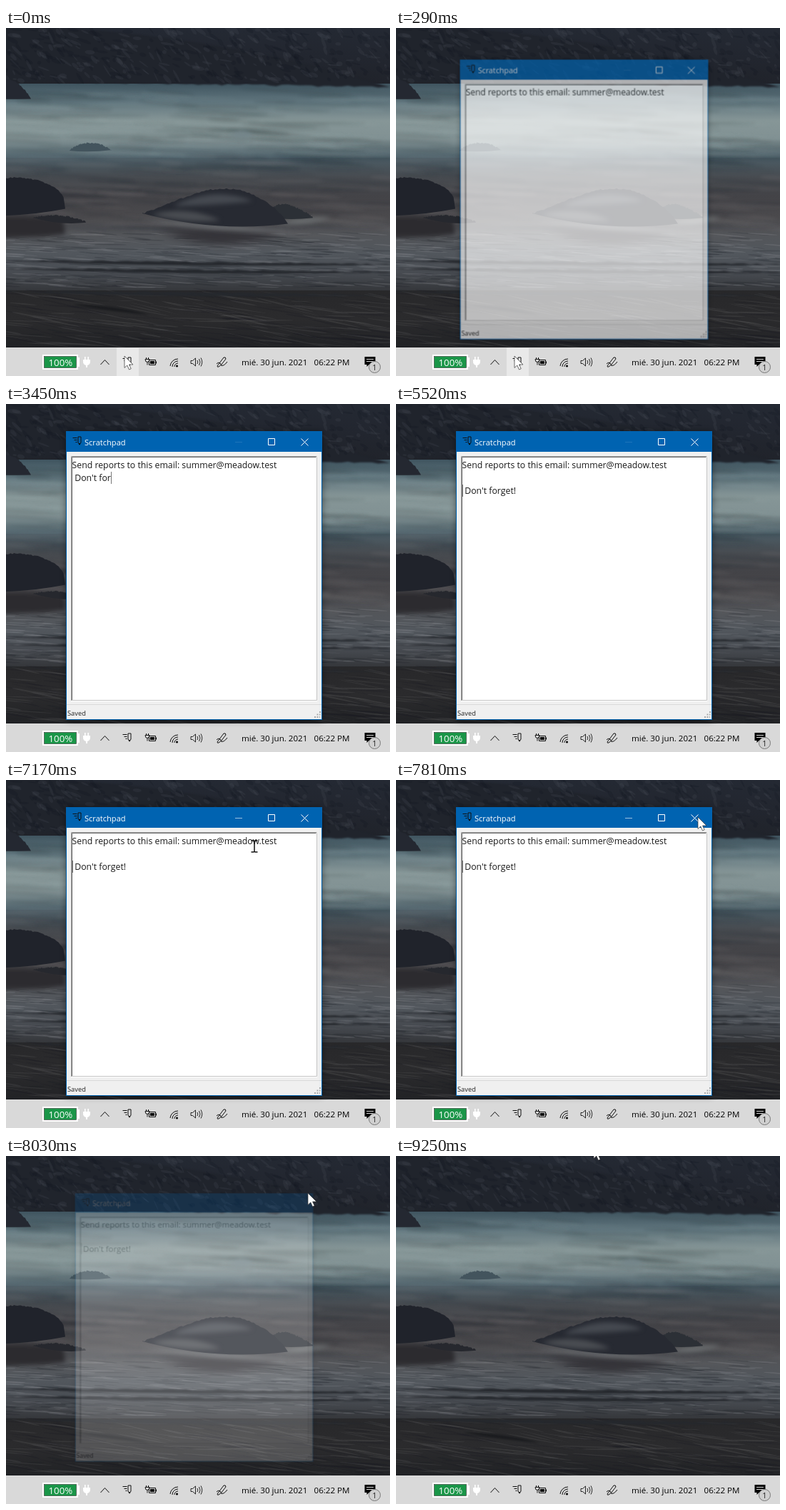
An HTML page with a canvas for the animation above (9.87 s loop, 538 by 488 pixels).

```html
<!DOCTYPE html>
<html lang="es">
<head>
<meta charset="utf-8">
<title>Scratchpad</title>
<style>
  html, body { margin: 0; width: 538px; height: 488px; overflow: hidden; background: #22262e; }
  canvas, svg { position: absolute; left: 0; top: 0; }
  text { font-family: "Open Sans", "Noto Sans", sans-serif; white-space: pre; }
  .pad text { font-size: 12.3px; fill: #1a1a1a; }
  .line { fill: none; stroke: #111; }
  #win { transform-origin: 263.5px 240.5px; filter: drop-shadow(0 1px 4px #0007); animation: win 9870ms linear infinite; }
  #hot { animation: hot 9870ms linear infinite; }
  #buttons { animation: buttons 9870ms step-end infinite; }
  #min { animation: min 9870ms step-end infinite; }
  @keyframes win {
    0%, 1.62% { opacity: 0; transform: scale(.9); animation-timing-function: ease-out; }
    4.25%, 79.94% { opacity: 1; transform: none; }
    80.65% { opacity: .6; transform: scale(.983); }
    81.76%, 100% { opacity: 0; transform: scale(.9); }
  }
  @keyframes hot {
    0%, 8.4% { opacity: 1; }
    11.35% { opacity: .45; }
    14.7%, 100% { opacity: 0; }
  }
  @keyframes buttons { 0% { opacity: 1; } 79.94%, 100% { opacity: 0; } }
  @keyframes min { 0% { opacity: .12; } 71.2%, 100% { opacity: .6; } }
</style>
</head>
<body>
<canvas id="sea" width="538" height="488"></canvas>
<svg width="538" height="488" viewBox="0 0 538 488">
  <defs>
    <g id="pen">
      <path class="line" d="M0 2h6M2 5h4M4 8h2M7.5 .5h4v8l-2 3l-2-3z"/>
      <path d="M8.500 9.500h2l-1 3z"/>
    </g>
  </defs>

  <g id="bar">
    <rect y="448" width="538" height="40" fill="#d9d9d9"/>
    <rect id="hot" x="155" y="449" width="31" height="39" fill="#e9e9e9"/>
    <path fill="#fff" d="M51 458h50v4h2v13h-2v4h-50z"/>
    <rect x="53.5" y="460.5" width="45" height="16" fill="#1a9648" stroke="#333" stroke-width=".6"/>
    <text x="59.5" y="473.5" font-size="13.3" fill="#fff">100%</text>
    <path fill="#fff" d="M110 461h1.600v4h2.800v-4h1.600v4h2v3q0 4-4 5v3h-2v-3q-4-1-4-5v-3h2z"/>
    <path class="line" d="M132.500 472l6-6.500l6 6.500"/>
    <use href="#pen" x="163.500" y="461.500"/>
    <g transform="translate(195 462)">
      <path class="line" d="M5.500 3.500h9v7h-9zM15.500 5.500v3"/>
      <path d="M7 5h6v4h-6z"/>
      <path class="line" d="M1.500 0v2M4.500 0v2M0 2.500h6q0 4-3 4t-3-4M3 6.500v4"/>
    </g>
    <g transform="translate(241 475)">
      <path class="line" d="M-11-1a11 11 0 0 1 11-10M-8 0a8 8 0 0 1 8-8M-5 0a5 5 0 0 1 5-5"/>
      <circle cx="-1.500" cy="-1" r="1.500"/>
    </g>
    <path class="line" stroke-width=".9" d="M259 466.500h2.500l4-3.500v11l-4-3.500h-2.500zM268 466q1.500 2.500 0 5M270.500 464q3 4.500 0 9M273 462.500q3.500 6 0 12"/>
    <path class="line" d="M295 471q2-3 5-1t-2 5q-2 1-2-1l9-12q3-1 3 2l-7 9q4 2 9-5"/>
    <g font-size="11.6" font-weight="500" fill="#000">
      <text x="330" y="473">mié. 30 jun. 2021</text>
      <text x="431.500" y="473">06:22 PM</text>
    </g>
    <path d="M502.500 461h15v11h-9l-3 3v-3h-3z"/>
    <path stroke="#ddd" d="M505 464.500h10M505 467.500h10"/>
    <circle cx="516.500" cy="475.500" r="8" fill="#d0d0d0" stroke="#777"/>
    <text x="516.500" y="479.500" font-size="11" text-anchor="middle" fill="#222">1</text>
  </g>

  <g id="win">
    <rect x="84" y="38" width="359" height="405" fill="#0063b1"/>
    <rect x="85" y="67" width="357" height="375" fill="#f0f0f0"/>
    <use href="#pen" x="93.500" y="45.500"/>
    <text x="110" y="57.500" font-size="11.1" fill="#fff">Scratchpad</text>
    <g id="buttons" fill="none" stroke="#fff">
      <path id="min" d="M321 53.500h10"/>
      <path d="M367.500 48.500h9v9h-9zM413.500 48.500l10 10M423.500 48.500l-10 10"/>
    </g>
    <rect x="91" y="73" width="345" height="344" fill="#fff"/>
    <path fill="none" stroke="#a0a0a0" d="M91.500 416v-342.500h344"/>
    <path fill="none" stroke="#696969" d="M92.500 415v-340.500h342"/>
    <path fill="none" stroke="#c4c4c4" d="M92 415.500h343.500v-341"/>
    <path stroke="#d9d9d9" d="M85 421.500h357"/>
    <text x="86" y="437" font-size="9.3" fill="#222">Saved</text>
    <path stroke="#aaa" stroke-width="2" stroke-dasharray="2 1.500" d="M432 439h8M435.500 435.500h5M439 432h2"/>
    <g class="pad">
      <text id="first" x="92.500" y="90">Send reports to this email: summer@meadow.test</text>
      <text id="note" x="93"></text>
      <rect id="caret" width="1" height="17" fill="#777"/>
    </g>
  </g>

  <path id="arrow" fill="#fff" stroke="#333" stroke-width=".7" d="M0 0v16.500l3.800-3.500l2.700 6l2.700-1.200l-2.600-5.800h5.400z"/>
  <path id="beam" fill="none" stroke="#111" stroke-width="1.500" d="M-4.500-8h3.500l1 1l1-1h3.500M0-7v14M-4.500 8h3.500l1-1l1 1h3.500"/>
</svg>
<script>
const LOOP = 9870;
const $ = id => document.getElementById(id);
const lerp = (a, b, k) => a + (b - a) * k;

// Coast scene: soft gradients, seeded streaks and humped rocks.
function paintSea() {
  const c = $("sea").getContext("2d");
  let seed = 7;
  const rnd = () => (seed = seed * 16807 % 2147483647) / 2147483647;

  // Colours spread evenly from top to bottom.
  function band(top, bottom, ...colours) {
    const g = c.createLinearGradient(0, top, 0, bottom);
    colours.forEach((col, i) => g.addColorStop(i / (colours.length - 1), col));
    c.fillStyle = g;
    c.fillRect(0, top, 538, bottom - top);
  }
  function streaks(n, top, bottom, len, thick, tilt, colour, alpha) {
    c.globalAlpha = alpha;
    for (let i = 0; i < n; i++) {
      c.fillStyle = rnd() < .5 ? colour : "#10141c";
      c.beginPath();
      c.ellipse(rnd() * 538, lerp(top, bottom, rnd()), len * (.3 + rnd()), thick * (.3 + rnd()), tilt * rnd(), 0, 7);
      c.fill();
    }
    c.globalAlpha = 1;
  }
  // A hump over a sloping base; skew moves the peak, flat squares it off.
  function rock(colour, x0, x1, y0, y1, h, { skew = 1, flat = .8, jag = 2, sag = 8, blur = .6 } = {}) {
    c.filter = `blur(${blur}px)`;
    c.fillStyle = colour;
    c.beginPath();
    for (let u = 0; u <= 1; u += 1 / 64) {
      const hump = h * Math.sin(Math.PI * u ** skew) ** flat;
      c.lineTo(lerp(x0, x1, u), lerp(y0, y1, u) - hump + jag * (rnd() - .5));
    }
    c.quadraticCurveTo((x0 + x1) / 2, (y0 + y1) / 2 + sag, x0, y0);
    c.fill();
    c.filter = "none";
  }

  band(0, 82, "#242933", "#22262f", "#20232a");
  band(78, 182, "#3f545f", "#61767e", "#869697", "#819193", "#50636c");
  band(182, 290, "#4b5c65", "#474b50", "#434347", "#4a494c", "#535559");
  band(290, 368, "#535559", "#52575d", "#484c52", "#35373b");
  band(368, 448, "#28282a", "#2b2b2d", "#212225");

  c.filter = "blur(2px)";
  streaks(110, 88, 180, 70, 2.5, .08, "#b4c2c0", .1);
  streaks(130, 180, 290, 60, 2.5, .08, "#a09c98", .11);
  c.filter = "blur(.4px)";
  streaks(420, 288, 364, 24, .9, .1, "#a9adb2", .17);
  streaks(240, 370, 448, 36, .9, .25, "#88878a", .14);
  rock("#20242c", 0, 538, -3, 6, -77, { flat: 0, jag: 3, sag: 0, blur: 1 });
  c.filter = "blur(.7px)";
  streaks(420, 2, 74, 8, 2.5, 1.2, "#4d5058", .2);

  const soft = { jag: 0, blur: 3 };
  rock("#242831", -35, 35, 100, 100, 28, { sag: 0 });
  rock("#43545d", 88, 148, 172, 172, 11, { sag: 3 });
  rock("#74858a", 314, 347, 151, 151, 7, soft);
  rock("#2c2b2f", -60, 83, 290, 290, 26, { ...soft, flat: .1 });
  rock("#333237", 215, 385, 284, 288, 4, { ...soft, sag: 34, blur: 6 });
  rock("#7b7f82", 188, 402, 268, 286, 0, soft);
  rock("#6c7072", 380, 456, 274, 266, 3, soft);
  rock("#20232b", -70, 83, 260, 254, 47, { flat: .35, sag: 12 });
  rock("#26282e", 38, 112, 266, 272, 6);
  rock("#2c3036", 368, 430, 266, 266, 19, { skew: .6, sag: 4 });
  rock("#272a32", 191, 395, 260, 274, 43, { skew: 1.36, sag: 20 });
  rock("#454950", 235, 345, 250, 243, 13, { ...soft, sag: 2 });
  rock("#4a4d52", 205, 300, 262, 270, 9, soft);

  // Dark ripples on the wet sand.
  for (const y of [326, 337, 369]) rock("#25282d", -20, 560, y, y + 6, 1, { sag: 8, blur: 1 });
  rock("#1b1c1f", 95, 200, 388, 402, 4, { ...soft, sag: 3, blur: 1 });
}

const NOTE = " Don't forget!";
// Typing bursts: first key, last key, letters.
const BURSTS = [[2530, 2730, 3], [2970, 3030, 2], [3200, 3450, 5], [3600, 3810, 3], [4110, 4111, 1]];
const BLINKS = [[1450, 1970], [2290, 4640], [5150, 6040], [6570, LOOP]];
// Cursor moves: start, end, destination.
const MOVES = [[830, 1120, 205, 338], [6040, 7170, 348, 93], [7270, 7620, 423, 52], [8370, 9250, 277, -13]];
const within = (t, [a, b]) => t >= a && t < b;
const show = (el, on) => el.setAttribute("visibility", on ? "visible" : "hidden");

function typed(t) {
  return BURSTS.reduce((sum, [from, to, n]) => {
    const keys = 1 + Math.floor((t - from) / (to - from) * (n - 1));
    return sum + (t < from ? 0 : Math.min(n, keys));
  }, 0);
}

function drawText(t) {
  const row = t < 2290 ? 0 : t < 5520 ? 1 : 2;
  const note = $("note"), caret = $("caret");
  note.textContent = NOTE.slice(0, typed(t));
  note.setAttribute("y", 90 + 18 * row);
  const line = row ? note : $("first");
  const width = t >= 5350 || !line.textContent ? 0 : line.getComputedTextLength();
  caret.setAttribute("x", Math.round(93 + width));
  caret.setAttribute("y", 77 + 18 * row);
  show(caret, BLINKS.some(b => within(t, b)));
}

function drawCursor(t) {
  let x = 166, y = 460;
  for (const [from, to, endX, endY] of MOVES) {
    const p = Math.min(1, Math.max(0, (t - from) / (to - from)));
    const k = p * p * (3 - 2 * p);
    x = lerp(x, endX, k);
    y = lerp(y, endY, k);
  }
  const inPad = within(t, [420, 7890]) && within(x, [92, 436]) && within(y, [74, 416]);
  const typing = within(t, [2290, 6040]);
  for (const id of ["arrow", "beam"]) {
    $(id).setAttribute("transform", `translate(${x} ${y})`);
    show($(id), !typing && inPad === (id === "beam"));
  }
}

let start;
function frame(now) {
  start ??= now;
  const t = (now - start) % LOOP;
  drawText(t);
  drawCursor(t);
  requestAnimationFrame(frame);
}
paintSea();
requestAnimationFrame(frame);
</script>
</body>
</html>
```
